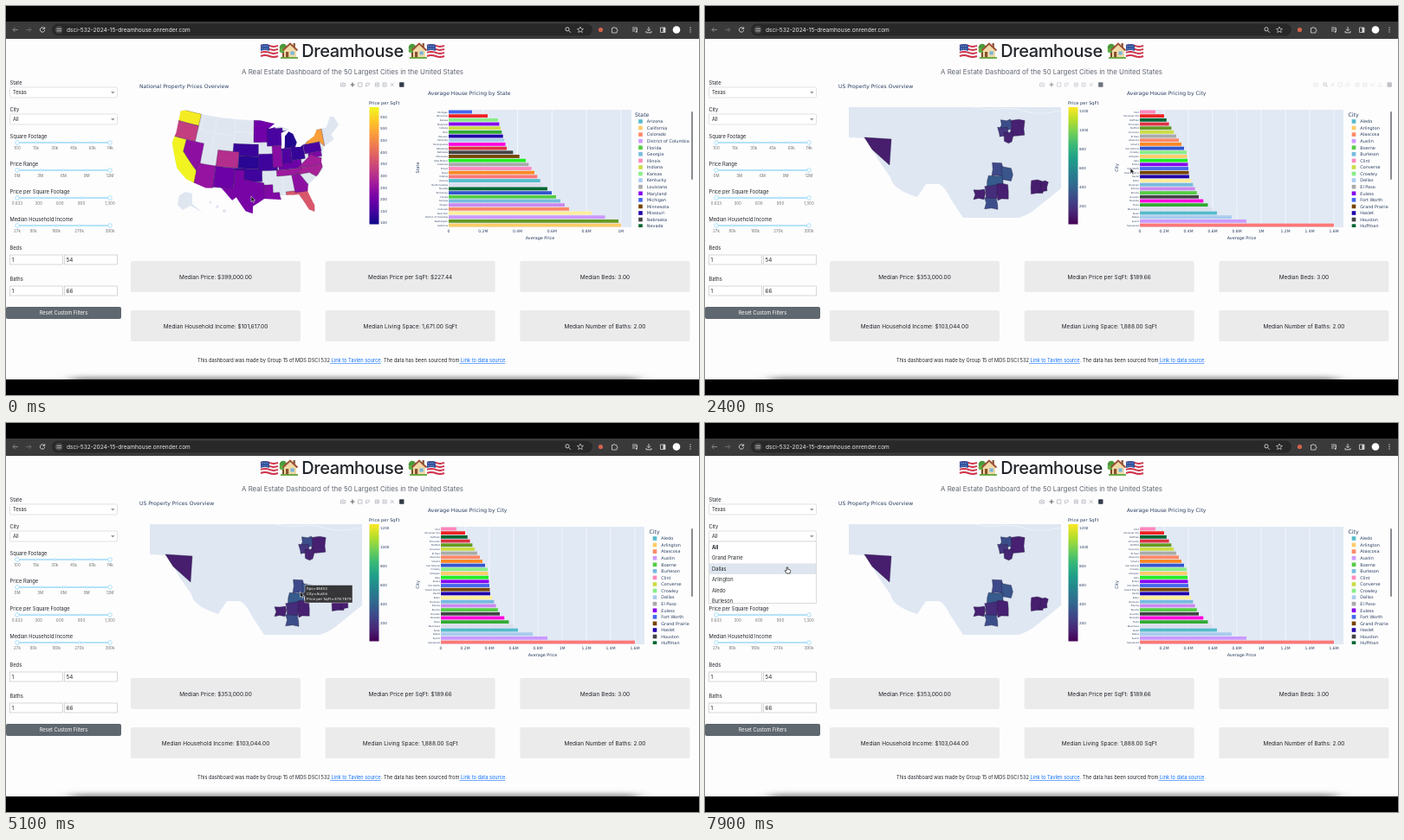
These frames come from a looping animation (800x450 px, 8000 ms). An HTML page:

```html
<!DOCTYPE html>
<html lang="en">
<head>
<meta charset="utf-8">
<title>Dreamhouse</title>
<style>
html,body{margin:0;width:100%;height:100%;overflow:hidden;background:#000}
svg{display:block;width:800px;height:450px;font-family:Inter,"Liberation Sans",sans-serif}
.plot{font-family:"DejaVu Sans",Verdana,sans-serif;fill:#2a3f5f}
</style>
</head>
<body>
<script>
const INK = '#212529', LIGHT = '#dfe6f0';
const MID = 'text-anchor="middle"', END = 'text-anchor="end"';
const range = n => [...Array(n).keys()];
const text = (x, y, s, size, o = '') => `<text x="${x}" y="${y}" font-size="${size}" ${o}>${s}</text>`;
const rect = (x, y, w, h, fill, o = '') => `<rect x="${x}" y="${y}" width="${w}" height="${h}" fill="${fill}" ${o}/>`;
const path = (d, fill, o = '') => `<path d="${d}" fill="${fill}" ${o}/>`;
const line = (d, color, w = 1, o = '') => path(d, 'none', `stroke="${color}" stroke-width="${w}" ${o}`);
const dot = (x, y, r, fill, o = '') => `<circle cx="${x}" cy="${y}" r="${r}" fill="${fill}" ${o}/>`;
const group = (id, s, o = '') => `<g id="${id}" ${o}>${s}</g>`;
const clip = (id, s) => `<clipPath id="${id}">${s}</clipPath>`;

// values between key points [position, ...values]
function along(keys, t, ease = p => p) {
  const i = Math.max(1, keys.findIndex(k => k[0] >= t)), a = keys[i - 1], b = keys[i];
  const p = ease((t - a[0]) / (b[0] - a[0]));
  return a.slice(1).map((v, j) => v + (b[j + 1] - v) * p);
}

// ---------- browser bar ----------
function toolbar() {
  const c = '#d5d6d8';
  return rect(0, 18, 800, 20, '#3a3a3b') + rect(53, 20.5, 624, 14, '#282829', 'rx="7"') +
    line('M14 27.5H8M10.5 25L8 27.5L10.5 30', '#8d8d8f', .9) +
    line('M23 27.5H29M26.5 25L29 27.5L26.5 30', '#6c6c6e', .9) +
    line('M44.3 26A2.7 2.7 0 1 0 44.7 28M44.7 24.3V26.5H42.5', c, .9) +
    dot(61, 27.5, 4.5, '#444') + line('M58.5 26.3H64M58.5 28.8H64', c, .8) +
    text(70, 30, 'dsci-532-2024-15-dreamhouse.onrender.com', 6.55, 'fill="#e8e8e8"') +
    dot(648, 26.8, 2.1, 'none', `stroke="${c}" stroke-width=".9"`) + line('M649.6 28.4L652 30.8', c, .9) +
    line('M663 24l1 2.3 2.5 .2-1.9 1.6.6 2.5-2.2-1.3-2.2 1.3.6-2.5-1.9-1.6 2.5-.2z', c, .7) +
    dot(686.5, 27.5, 2.6, '#d4644a') +
    line('M699.5 25.500h1.7a1 1 0 0 1 2 0h1.8v1.8a1 1 0 0 1 0 2v1.7h-5.5z', c, .8) +
    line('M723 25h5M723 27h5M723 29h3M728.5 25v4.5', c, .8) + dot(727.7, 29.8, 1, c) +
    line('M742 24v4.5M740 26.7L742 28.7L744 26.7M739 29v1.8H745V29', c, .9) +
    line('M755.5 25h5.5v5.5H755.5z', c, .8) + rect(758.5, 25, 2.5, 5.5, c) +
    dot(774, 27.5, 4.3, '#fff') + [25, 27.5, 30].map(y => dot(790, y, .7, c)).join('');
}

// ---------- heading ----------
function heading() {
  const flag = range(7).map(i => line(`M294 ${46 + i * 2}q5-2 10 0t10 0`, i % 2 ? '#f4f4f4' : '#d0324a', 2)).join('') +
    path('M294 45q5-2 10 0v7q-5-2-10 0z', '#35559f') +
    range(6).map(i => dot(296 + i % 3 * 2.5, 46.5 + (i > 2) * 2.8, .4, '#fff')).join('');
  const house = rect(319, 52, 2, 8, '#7a4a2a') + dot(320, 48, 4.3, '#4c9a3b') + dot(318.5, 51.5, 2.8, '#5fae43') +
    path('M321 60V50L328 44L335 50V60z', '#f0d9a8') + rect(331.5, 43, 2.4, 5, '#8b5a3c') +
    line('M319.5 51.5L328 43.5L336.5 51.5', '#9c5136', 2) + rect(323, 53, 3.2, 7, '#8a5230') +
    rect(328.5, 52.5, 4.3, 4, '#78b7dc') + line('M317 60H337', '#63a53c', 1.8);
  return group('flag', flag) + group('house', house) + '<use href="#flag" x="192"/><use href="#house" x="149"/>' +
    text(400, 59, 'Dreamhouse', 20, MID + ' font-weight="500" letter-spacing="-.4"') +
    text(400, 79, 'A Real Estate Dashboard of the 50 Largest Cities in the United States', 7.9, MID + ' fill="#60676e"');
}

// ---------- filters ----------
const label = (y, s) => text(4.5, y, s, 5.75);
const select = (name, value, y) => label(y - 3, name) +
  rect(4.5, y, 124, 12, '#fff', 'rx="1.5" stroke="#d6d6d6" stroke-width=".7"') +
  text(8, y + 8.2, value, 5.75) + path(`M121 ${y + 5}h4.6l-2.3 2.5z`, '#999');
const amount = s => parseFloat(s.replace(',', '')) * (s.endsWith('k') ? 1000 : 1);
function slider(name, y, marks) {
  const list = marks.split(' '), lo = amount(list[0]), hi = amount(list.at(-1));
  return label(y - 5, name) + rect(13, y - .8, 107, 1.6, '#a5dcf7') + list.map((s, i) => {
    const x = 13 + 107 * (amount(s) - lo) / (hi - lo), r = i % (list.length - 1) ? 1.2 : 2.3;
    return dot(x, y, r, '#fff', 'stroke="#96dbfa" stroke-width=".8"') + text(x, y + 8, s, 4.5, MID + ' fill="#6f6f6f"');
  }).join('');
}
const inputs = (name, y, a, b) => label(y - 6, name) + [[4.5, a], [67.5, b]].map(([x, v]) =>
  rect(x, y, 61, 11, '#fff', 'stroke="#c6c6c6" stroke-width=".7"') + text(x + 2, y + 8, v, 6.3)).join('');
const filters = () => select('State', 'Texas', 94) + select('City', 'All', 125) +
  slider('Square Footage', 158, '100 15k 30k 45k 60k 74k') + slider('Price Range', 190, '0M 3M 6M 9M 12M') +
  slider('Price per Square Footage', 222, '0.633 300 600 900 1,300') +
  slider('Median Household Income', 254, '27k 90k 180k 270k 390k') +
  inputs('Beds', 288, 1, 54) + inputs('Baths', 324, 1, 66) +
  rect(0, 348, 133, 14, '#5f676f', 'rx="2"') + text(66.5, 357.2, 'Reset Custom Filters', 5.7, MID + ' fill="#fff"');

const ROW = 12.55, TOP = 137.3;
const menu = () => rect(4.5, 137, 124, 71.5, '#fff', 'stroke="#ccc" stroke-width=".7"') +
  rect(5, TOP, 123, ROW, '#dee5ee', 'id="hot"') + '<g clip-path="url(#menuClip)">' +
  ['All', 'Grand Prairie', 'Dallas', 'Arlington', 'Aledo', 'Burleson'].map((s, i) =>
    text(8, TOP + 8.4 + i * ROW, s, 5.75, i ? '' : 'font-weight="bold"')).join('') + '</g>';

// ---------- summary cards and footer ----------
const cards = values => ['Median Price: $', 'Median Price per SqFt: $', 'Median Beds: ',
  'Median Household Income: $', 'Median Living Space: ', 'Median Number of Baths: '].map((s, i) => {
  const x = 144 + i % 3 * 224.7, y = i < 3 ? 295 : 352;
  return rect(x, y, 196, 36, '#ebebec', 'rx="2"') + text(x + 98, y + 20.5, s + values[i], 6.5, MID);
}).join('');
const link = s => `<tspan fill="#0d6efd" text-decoration="underline"> ${s}</tspan>`;
const footer = () => text(399.5, 412.3, 'This dashboard was made by Group 15 of MDS DSCI 532' + link('Link to Tavlen source') +
  '. The data has been sourced from' + link('Link to data source') + '.', 5.7, MID);

// ---------- colour scales ----------
const plasma = '0d0887 46039f 7201a8 9c179e bd3786 d8576b ed7953 fb9f3a fdca26 f0f921'.split(' ');
const viridis = '440154 482878 3e4989 31688e 26828e 1f9e89 35b779 6ece58 b5de2b fde725'.split(' ');
function shade(scale, v) {
  const p = Math.min(.999, Math.max(0, v)) * 9, i = Math.floor(p);
  const mix = [0, 2, 4].map(k => {
    const [a, b] = [scale[i], scale[i + 1]].map(c => parseInt(c.slice(k, k + 2), 16));
    return Math.round(a + (b - a) * (p - i));
  });
  return `rgb(${mix})`;
}
const gradient = (id, scale) => `<linearGradient id="${id}" y1="1" x2="0" y2="0">` +
  scale.map((c, i) => `<stop offset="${i / 9}" stop-color="#${c}"/>`).join('') + '</linearGradient>';
const scaleBar = (id, max, step, count, y, dy) => text(419, 114, 'Price per SqFt', 5.1) +
  rect(419.5, 117, 11, 135.5, `url(#${id})`) +
  range(count).map(i => text(432, y + i * dy + 1.6, max - i * step, 4.1)).join('');

// ---------- country map (Albers projection) ----------
const N = .60285, RAD = Math.PI / 180;
function albers(west, lat) {
  const r = 267 * Math.sqrt(1.3512 - 2 * N * Math.sin(lat * RAD)) / N, a = N * (96 - west) * RAD;
  return (290 + r * Math.sin(a)).toFixed(1) + ' ' + (r * Math.cos(a) - 162).toFixed(1);
}
// two points give a box, more give a polygon; edges are subdivided so parallels curve
function geo(s) {
  let p = s.split(',').map(q => q.split(' ').map(Number));
  if (p.length == 2) p = [p[0], [p[1][0], p[0][1]], p[1], [p[0][0], p[1][1]]];
  return 'M' + p.flatMap(([x, y], i) => {
    const [u, v] = p[(i + 1) % p.length];
    return range(4).map(k => albers(x + (u - x) * k / 4, y + (v - y) * k / 4));
  }).join('L') + 'Z';
}
const COAST = geo('124.7 48.4,122.8 49,95 49,89.6 48,92 46.8,88 47.3,84.5 46.3,87.5 45.6,87.8 41.7,86.8 41.8,86.3 44.7,' +
  '84.8 45.7,83.4 45,82.5 42.8,83.3 41.7,81.5 41.6,79 42.7,76.3 43.6,75 45,71.5 45,69.2 47.4,68 47.1,67 44.8,' +
  '70.5 43,70 41.7,74 40.5,75.8 37,75.6 35.3,81 32,81.4 30.5,80.1 26.8,80.4 25.2,81.8 26,82.8 28,84 30,' +
  '89.5 30.3,89.2 29.2,94 29.6,97.2 27.7,97.2 25.9,99.2 26.5,102 29.8,103.1 29,106.5 31.8,111 31.3,117.1 32.5,120.6 34.6,124.3 40.3,124 43');
const state = (price, s) => path(geo(s), price ? shade(plasma, (price - 95) / 460) : LIGHT,
  `stroke="${price ? '#3a2b55' : '#f4f7fa'}" stroke-width=".35"`);
const usMap = () => path(COAST, LIGHT) + '<g clip-path="url(#usClip)">' +
  state(0, '111 45,104 41') + state(0, '104 49,96.6 45.9') + state(0, '104 45.9,96.5 43') + state(0, '116 49,111 45') + state(0, '88.4 35,85.5 30') +
  state(540, '125 49,117 46') + state(310, '125 46,117 42') +
  state(550, '125 42,120 42,120 39,114.6 35,114.5 32,125 32') + state(230, '120 42,114 42,114 36,114.6 35,120 39') +
  state(240, '114.7 37,109 31') + state(190, '109 37,103 31.8') + state(135, '104 43,95.6 40') +
  state(285, '109 41,102 37') + state(120, '102 40,94.6 37') + state(140, '103 37,94.5 33.8') +
  state(205, '103 36.5,100 36.5,100 34.3,94 33.5,93.7 29,97 25,107 28,106.6 31.9,103 32') +
  state(195, '97.2 49,89.6 43.5') + state(150, '92.6 46.8,87 42.5') + state(140, '95.6 40.6,89.6 36.5') +
  state(190, '89.2 38.6,82 36.5') + state(225, '91 42.5,87.9 37.2') + state(155, '87.9 41.7,84.8 38') +
  state(115, '87 46,82 41.7') + state(130, '84.8 42,80.6 38.6') + state(150, '80.5 42,75 39.7') +
  state(210, '79.4 39.7,75.2 38.4') + state(450, '79.8 42,76 45,73.3 45,73.6 40.6,75 42') +
  state(260, '83.5 36.5,78.5 39.4,77 38.5,75.5 38,75.5 36.5') + state(250, '90 36.5,82 35') +
  state(265, '84 35,81.7 36.5,75 36.5,78 33.7,80 35') + state(350, '87.6 31,79 24') +
  state(230, '85.5 35,83 35,80.8 32,81.4 30.6,85 30.6') +
  state(215, '94 33,91.4 33,91.4 31,89.6 31,89 29,94 29') + '</g>' +
  path('M200 219L207 215L215 217V229L227 239L213 231L204 236L198 230z', LIGHT) +
  [0, 1, 2].map(i => dot(236 + i * 8, 227 + i * 5, 1.5 + i * .3, LIGHT)).join('');

// ---------- county map ----------
let seed = 7;
const jitter = () => (seed = seed * 16807 % 2147483647) / 2147483647 * 3 - 1.5;
const countyStyle = 'stroke="#1f1b3d" stroke-width=".4"';
// rough block: eight points around a box, each nudged
const county = (price, x, y, w, h) => path('M' + range(8).map(i => {
  const a = i * Math.PI / 4, side = v => Math.max(-.5, Math.min(.5, v * .75));
  return `${x + w * side(Math.cos(a)) + jitter()} ${y + h * side(Math.sin(a)) + jitter()}`;
}).join('L') + 'z', shade(viridis, price / 1250), countyStyle);
const texasMap = () =>
  path('M166 117H411V211L380 236Q372 242 362 245H298L283 222Q277 209 270 206H255L245 221Q216 212 214 198L200 178L186 153L166 152z', '#dfe7f2') +
  line('M310 117Q325 121 340 119T370 122T411 121', '#f4f7fb', .7) +
  path('M184 152L215 154L213 184L193 166z', shade(viridis, .08), countyStyle) +
  county(110, 361, 141, 17, 18) + county(300, 347, 137, 12, 11) + county(200, 344, 146, 10, 10) + county(120, 350, 152, 9, 11) +
  county(280, 337, 189, 12, 14) + county(330, 348, 194, 13, 15) + county(360, 335, 204, 16, 14) + county(110, 317, 217, 11, 11) +
  county(160, 331, 215, 14, 15) + county(300, 330, 228, 13, 12) + county(110, 343, 215, 13, 17) +
  county(100, 383, 210, 14, 15) + county(100, 391, 209, 9, 11);

// ---------- bar charts ----------
// colours follow the alphabetical order of the names
const palette = ('5bc fc6 f86 c9f 5c4 7bd f8b cd4 8e8 ace aaa 80e 46e 740 20a 444 063 2e2 fe9 dde 3a3 ' +
  'd34 c8e f0d 35c f82 f77 692 e22').split(' ');
const sorted = bars => [...bars].sort((a, b) => a.name < b.name ? -1 : 1);
function makeBars(names, ends) {
  const bars = names.split(',').map((name, i) => ({ name, y: 122.5 + i * 4.68, end: along(ends, i)[0] }));
  sorted(bars).forEach((b, i) => b.fill = '#' + palette[i]);
  return bars;
}
const states = makeBars('Michigan,Wisconsin,Kansas,Maryland,Indiana,Ohio,Missouri,Kentucky,Pennsylvania,Oklahoma,Nebraska,Minnesota,' +
  'New Mexico,Louisiana,Illinois,Texas,Virginia,Arizona,North Carolina,Nevada,Tennessee,Florida,Georgia,Oregon,Colorado,New York,' +
  'District of Columbia,Washington,California',
  [[0, 538], [1, 556], [2, 568], [9, 578], [12, 600], [18, 620], [24, 650], [25, 676], [27, 707], [28, 710]]);
const cities = makeBars('Clint,Universal City,Huffman,Princeton,Stafford,Converse,El Paso,Atascosa,Schertz,San Antonio,Crowley,Arlington,' +
  'Katy,Euless,Fort Worth,Grand Prairie,Haslet,Keller,Burleson,Rhome,Boerne,Houston,Roanoke,Plano,Manchaca,Aledo,Dallas,Austin,Spicewood',
  [[0, 520], [1, 530], [6, 544], [10, 556], [16, 559], [21, 570], [25, 591], [27, 625], [28, 726]]);

function chart(bars, kind, x0, x1, step, ticks, legendX) {
  return text(487, 102.5, 'Average House Pricing by ' + kind, 6.07) + rect(x0, 120, x1 - x0, 136, '#e1e9f4') +
    range(ticks).map(i => line(`M${x0 + i * step} 120V256`, '#fff', .6) +
      text(x0 + i * step, 261.5, i ? +(i * .2).toFixed(1) + 'M' : 0, 4.5, MID)).join('') +
    bars.map(b => rect(x0, b.y - 1.9, b.end - x0, 3.8, b.fill) + text(x0 - 1, b.y + 1, b.name, 2.6, END)).join('') +
    text((x0 + x1) / 2, 270, 'Average Price', 4.9, MID) +
    text(0, 0, kind, 4.9, MID + ' transform="translate(477 187) rotate(-90)"') +
    text(legendX - 6.5, 128, kind, 6.2) + '<g clip-path="url(#legendClip)">' +
    sorted(bars).slice(0, 17).map((b, i) => rect(legendX - 2.3, 131.2 + i * 7.57, 4.6, 4.6, b.fill) +
      text(legendX + 7.3, 135.3 + i * 7.57, b.name, 4.94)).join('') + '</g>';
}

// ---------- chart tool icons ----------
function modebar(x, groups) {
  const icons = {
    c: 'M-2.5-1.5H-1L-.5-2.3H.5L1-1.5H2.5V2H-2.5zM-.7 .2a.7 .7 0 1 0 1.4 0a.7 .7 0 1 0-1.4 0',
    p: 'M-2.5 0H2.5M0-2.5V2.5', b: 'M-2.2-2.2H2.2V2.2H-2.2z', l: 'M-2 1.5Q-3-2 0-2T2 0T-1 1L-2 2.5',
    i: 'M-2-2H2V2H-2zM-1 0H1M0-1V1', o: 'M-2-2H2V2H-2zM-1 0H1', a: 'M-2-2L2 2M2-2L-2 2',
    h: 'M-2.5 0L0-2.3L2.5 0M-1.7 0V2H1.7V0', z: 'M-2-.5a1.7 1.7 0 1 0 3.4 0a1.7 1.7 0 1 0-3.4 0M1 .8L2.5 2.4'
  };
  let s = '';
  for (const set of groups.split(' ')) {
    [...set].forEach((k, i) => {
      const on = i == 0 && set.length > 1 && 'pz'.includes(k);
      s += line(icons[k], on ? '#666' : '#b0b4bb', on ? 1.1 : .8, `transform="translate(${x} 91)"`);
      x += 8.7;
    });
    x += 2.3;
  }
  return s + rect(x - 2.7, 88.3, 5.4, 5.4, '#333b48', 'rx=".6"');
}

// ---------- page ----------
document.body.innerHTML = `<svg viewBox="0 0 800 450" fill="${INK}"><defs>` +
  gradient('plasma', plasma) + gradient('viridis', viridis) + clip('usClip', path(COAST)) +
  clip('legendClip', rect(700, 110, 100, 146)) + clip('menuClip', rect(5, 137, 123, 71)) + clip('pageClip', rect(0, 38, 800, 394)) +
  '<filter id="soft" x="-10%" y="-300%" width="120%" height="700%"><feGaussianBlur stdDeviation="9 3"/></filter></defs>' +
  rect(0, 0, 800, 450, '#000') + toolbar() + rect(0, 38, 800, 394, '#fdfdfe') +
  `<g clip-path="url(#pageClip)">${rect(75, 430, 655, 8, '#777', 'filter="url(#soft)"')}</g>` + heading() + filters() +
  group('nation', cards(['399,000.00', '227.44', '3.00', '101,617.00', '1,671.00 SqFt', '2.00']) + '<g class="plot">' +
    text(154, 95, 'National Property Prices Overview', 6.07) + usMap() + scaleBar('plasma', 550, 50, 10, 128, 13.65) +
    chart(states, 'State', 511, 722, 39.75, 6, 732.5) + '</g>') +
  group('texas', cards(['353,000.00', '189.66', '3.00', '103,044.00', '1,888.00 SqFt', '2.00']) + '<g class="plot">' +
    text(154, 95, 'US Property Prices Overview', 6.07) + texasMap() + scaleBar('viridis', 1200, 200, 6, 121, 22) +
    chart(cities, 'City', 502, 737, 28, 9, 749) + '</g>') +
  rect(791, 122, 2, 79, '#8b8d91', 'rx="1"') +
  group('leftTools', modebar(389, 'c pbl ioa')) + group('rightTools', modebar(705, 'c zpbl ioah')) + footer() +
  group('mapTip', path('M341 198L345 195.5V187.5H400V208H345V200.5z', '#363638', 'stroke="#fff" stroke-width=".4"') +
    ['fips=48453', 'City=Austin', 'Price per SqFt=378.7879'].map((s, i) => text(347, 193 + i * 6, s, 4.1, 'fill="#fff"')).join(''), 'class="plot"') +
  group('barTip', '', 'class="plot"') + group('menu', menu()) +
  group('arrow', path('M0 0V6.5L1.5 5.2L2.6 7.6L3.6 7.1L2.6 4.8H4.6z', '#111', 'stroke="#fff" stroke-width=".5"')) +
  group('hand', path('M-.8-3Q0-4 .7-3V-.8L3-.2Q4 .2 3.7 1.5L3 4H-.8L-2.8 1Q-2.3 0-.8 1z', '#fff', 'stroke="#111" stroke-width=".7"')) + '</svg>';

// ---------- motion ----------
const LOOP = 8000, SWITCH = 500, OPEN = 7000;
const track = [[0, 283, 220], [700, 283, 220], [1500, 310, 247.5], [1700, 310, 247.5], [2600, 517, 178.8], [3500, 517, 178.8],
  [4000, 500, 216], [4290, 372.5, 236], [4450, 372.5, 236], [4950, 339.5, 195], [5500, 339.5, 195], [6600, 103.5, 128.5],
  [7050, 103.5, 128.5], [7700, 95, 170], [LOOP, 95, 170]];
const pointer = t => along(track, t, p => p * p * (3 - 2 * p));
const el = id => document.getElementById(id);
const show = (id, on) => el(id).style.display = on ? '' : 'none';

function barTip(x, y) {
  const b = cities.find(c => Math.abs(c.y - y) < 2.34);
  if (!b || x < 502 || x > b.end) return '';
  const price = ((b.end - 502) / .14).toFixed(4);
  return path(`M${b.end} ${b.y}l2-2v-8.2h57v20.5h-57v-8.3z`, b.fill, 'stroke="#333" stroke-width=".5"') +
    ['City=' + b.name, `Average Price=${price}k`, 'Count=12'].map((s, k) =>
      text(b.end + 3.5, b.y - 4.3 + k * 6, s, 4, `fill="${INK}"`)).join('');
}

const start = performance.now();
function draw() {
  const t = (performance.now() - start) % LOOP, [x, y] = pointer(t), zoomed = t >= SWITCH, open = t >= OPEN;
  show('nation', !zoomed);
  show('texas', zoomed);
  // tool icons fade over 300 ms as the pointer changes chart
  const right = range(10).filter(k => pointer(Math.max(0, t - k * 30))[0] > 470).length / 10;
  el('rightTools').style.opacity = right;
  el('leftTools').style.opacity = 1 - right;
  el('barTip').innerHTML = zoomed ? barTip(x, y) : '';
  show('mapTip', zoomed && Math.hypot(x - 341, y - 196) < 9);
  show('menu', open);
  el('hot').setAttribute('y', TOP + ROW * Math.max(0, Math.floor((y - TOP) / ROW)));
  const over = open && y > TOP;
  show('arrow', !over);
  show('hand', over);
  el(over ? 'hand' : 'arrow').setAttribute('transform', `translate(${x} ${y})`);
  requestAnimationFrame(draw);
}
draw();
</script>
</body>
</html>
```
